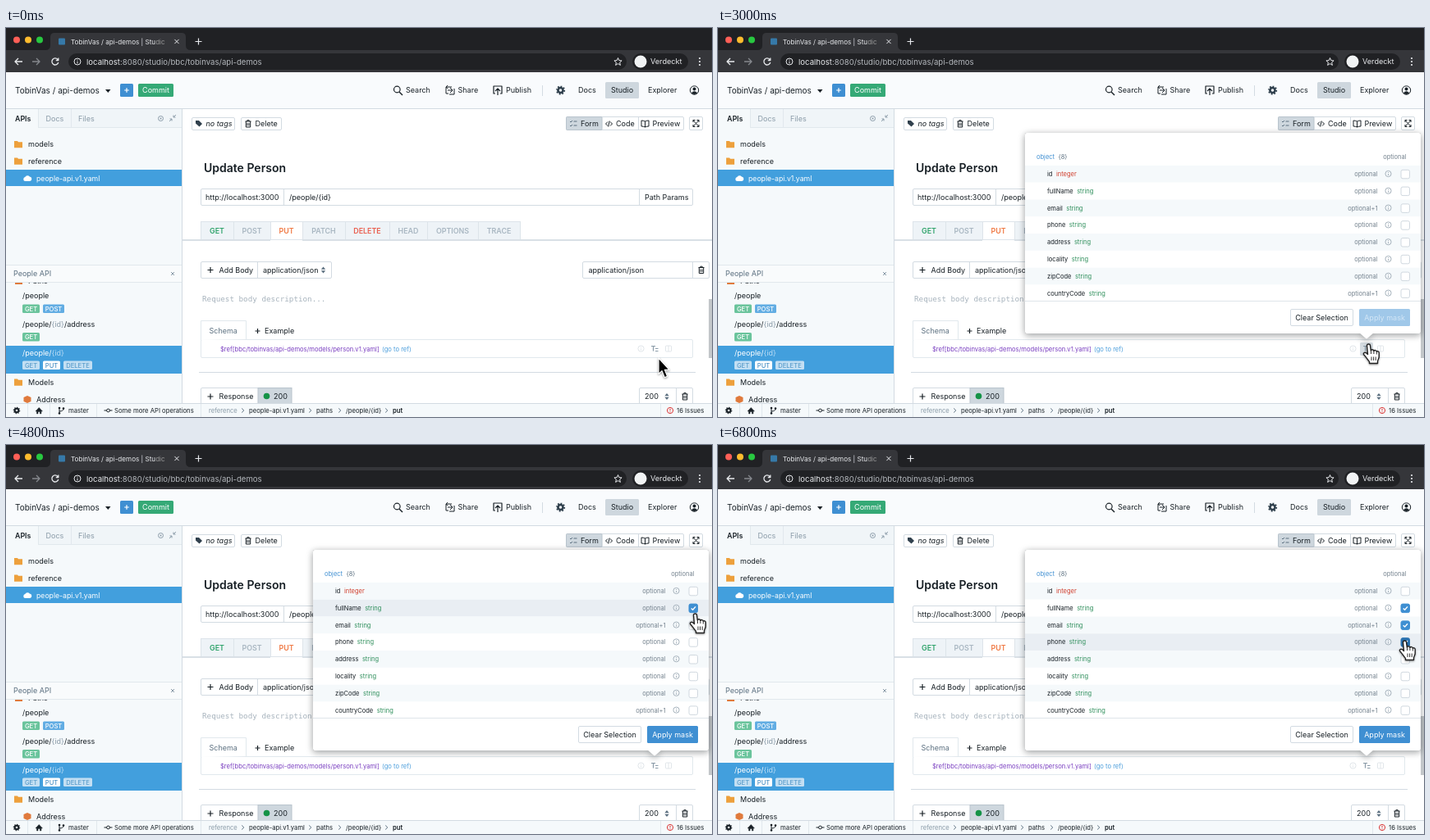
These frames come from a looping animation (860 by 475 pixels, 8000 ms). An HTML page:

```html
<!DOCTYPE html>
<html lang="en">
<head>
<meta charset="utf-8">
<title>API mask editor</title>
<style>
html, body { margin: 0; width: 100%; height: 100%; overflow: hidden; background: #fff }
svg { display: block; font-family: Inter, "Liberation Sans", sans-serif }
.mono { font-family: "DejaVu Sans Mono", monospace }
.pop { filter: drop-shadow(0 2px 4px #10161a50) drop-shadow(0 0 .6px #10161a70) }
.cursor { filter: drop-shadow(0 1px 1px #0006) }
</style>
</head>
<body>
<svg width="860" height="475" viewBox="0 0 860 475"><g id="page"></g><g id="live"></g></svg>
<script>
const INK = '#182026', GRAY = '#8a9ba8', MUTE = '#5c7080', LINE = '#d3dbe2', FAINT = '#e1e8ed';
const BLUE = '#3f8fd2', PALE = '#f5f9fb', ORANGE = '#eda03c';
const BOLD = 'font-weight="600"', MED = 'font-weight="500"', END = 'text-anchor="end"', MID = 'text-anchor="middle"';

const text = (x, y, size, s, fill = INK, attrs = '') =>
  `<text x="${x}" y="${y}" font-size="${size}" fill="${fill}" ${attrs}>${s}</text>`;
const rect = (x, y, w, h, fill, stroke = 'none', r = 0) =>
  `<rect x="${x}" y="${y}" width="${w}" height="${h}" rx="${r}" fill="${fill}" stroke="${stroke}"/>`;
const path = (d, stroke = INK, width = 1, fill = 'none') =>
  `<path d="${d}" stroke="${stroke}" stroke-width="${width}" fill="${fill}" stroke-linejoin="round"/>`;
const shape = (d, fill) => path(d, 'none', 0, fill);
const dot = (x, y, r, fill, stroke = 'none', attrs = '') =>
  `<circle cx="${x}" cy="${y}" r="${r}" fill="${fill}" stroke="${stroke}" ${attrs}/>`;
const frame = (x, y, w, h, stroke = LINE) => rect(x + .5, y + .5, w - 1, h - 1, '#fff', stroke, 1.5);

const plus = (x, y, r = 3.5, c = INK) => path(`M${x - r} ${y}h${2 * r}M${x} ${y - r}v${2 * r}`, c, 1.2);
const cross = (x, y, r, c) => path(`M${x - r} ${y - r}l${2 * r} ${2 * r}m0 ${-2 * r}l${-2 * r} ${2 * r}`, c);
const chevron = (x, y) => path(`M${x - 1.3} ${y - 2.5}l2.6 2.5-2.6 2.5`, MUTE);
const gear = (x, y, r, c) => dot(x, y, r * .65, 'none', c, `stroke-width="${r * .55}"`) +
  dot(x, y, r, 'none', c, `stroke-width="${r * .45}" pathLength="16" stroke-dasharray="1"`);
const info = (x, y, c) => dot(x, y, 3.6, 'none', c) + path(`M${x} ${y - 2}v1m0 1v2`, c);
const trash = (x, y) => path(`M${x - 3.5} ${y - 3}h7m-4.7 0v-1.3h2.4v1.3M${x - 2.7} ${y - 3}v7h5.4v-7m-3.7 2v3.4m2 0v-3.4`);
const carets = (x, y) => shape(`M${x} ${y - 4}l2.7 3.2h-5.4zM${x} ${y + 4}l2.7-3.2h-5.4z`, MUTE);
const folder = (x, y) => shape(`M${x} ${y}h4l1 1.3h5v7H${x}z`, ORANGE);
const badge = (x, y, w, s, fill, color = '#fff') =>
  rect(x, y, w, 10.5, fill, 'none', 1.5) + text(x + w / 2, y + 8, 7.6, s, color, `${MID} ${MED}`);

function chrome() {
  const light = '#e8eaed';
  return rect(0, 0, 860, 54, '#202124') + rect(0, 27, 860, 27, '#35363a') +
    dot(13, 14.5, 4, '#ff5f57') + dot(27, 14.5, 4, '#febc2e') + dot(41, 14.5, 4, '#28c840') +
    shape('M48 27q6 0 6-6v-10q0-5 5-5h155q5 0 5 5v10q0 6 6 6z', '#35363a') +
    rect(64, 12.5, 8, 8, '#3679a8', 'none', 1) +
    text(79, 20, 8.1, 'TobinVas / api-demos | Stu<tspan fill="#999">dic</tspan>', light) +
    cross(208, 16.5, 2.6, light) + plus(234.5, 16.5, 4, light) +
    path('M20 41h-9m4-4l-4 4 4 4', light, 1.3) + path('M32 41h9m-4-4l4 4-4 4', '#85888d', 1.3) +
    path('M63 38.4a4 4 0 1 0 .8 3.6M63.8 36.5v3h-3', light, 1.3) +
    rect(76, 31, 680, 20, '#202124', 'none', 10) +
    dot(87, 41, 4, 'none', light) + path('M87 38.6v1m0 1v2.8', light) +
    text(98, 44.5, 9.6, 'localhost<tspan fill="#b4b8bd">:8080/studio/bbc/tobinvas/api-demos</tspan>', light) +
    path('M745.5 36.5l1.3 3.1 3.3.3-2.5 2.2.8 3.3-2.9-1.8-2.9 1.8.8-3.3-2.5-2.2 3.3-.3z', light) +
    rect(763, 31, 68, 20, '#202124', 'none', 10) + dot(773, 41, 7.5, '#f1f3f4') +
    text(785, 44.3, 9.1, 'Verdeckt', light) +
    [37, 41, 45].map(y => dot(845, y, 1.1, light)).join('');
}

function header() {
  return rect(0, 54, 860, 45, '#f9fbfd') + rect(0, 98, 860, 1, LINE) +
    text(11, 80, 10, 'TobinVas / api-demos') + shape('M121 75h6.5l-3.2 4z', INK) +
    rect(139, 68, 16, 16, BLUE, 'none', 1.5) + plus(147, 76, 2.8, '#fff') +
    rect(161, 68, 43, 16, '#35a976', 'none', 1.5) + text(182.5, 79.4, 9, 'Commit', '#fff', MID) +
    dot(476.3, 75, 3.8, 'none', INK, 'stroke-width="1.2"') + path('M479 78l4 4', INK, 1.5) +
    text(487, 79.3, 9, 'Search') +
    path('M543 72h-7v8h3M538 70l-2 2 2 2M538 76h6m-3-3l3 3-3 3M546 74v7h-6') + text(550.5, 79.3, 9, 'Share') +
    path('M596 80h-2v-9h10v9h-2M599 82v-8m-3 3l3-3 3 3', INK, 1.2) + text(609, 79.3, 9, 'Publish') +
    rect(653, 70, 1, 13, LINE) + gear(675.5, 76, 4.6, '#30404d') +
    text(697, 79.3, 9, 'Docs') + rect(730, 66, 41, 20, '#ced7de', 'none', 1.5) +
    text(750.5, 79.3, 9, 'Studio', INK, MID) + text(782, 79.3, 9, 'Explorer') +
    dot(838.5, 76, 5.2, 'none', INK) + dot(838.5, 74.6, 2, INK) + path('M835 79.5q3.5-4 7 0l-3.5 1.6z', INK, .5, INK);
}

function sidebar() {
  const selected = '#429fdd', green = '#6ac49c', blue = '#62ade3';
  return rect(0, 99, 215, 359, PALE) + rect(39, 99, 175, 22, '#f0f5f8') +
    path('M39.5 99v22M39 121.5h175M79.5 99v22', FAINT) +
    text(11, 113.5, 8.8, 'APIs', INK, BOLD) + text(48.5, 113.5, 9, 'Docs', GRAY) + text(88, 113.5, 9, 'Files', GRAY) +
    dot(188.5, 110.5, 3, 'none', GRAY) + dot(188.5, 110.5, 1, GRAY) +
    path('M207 106l-3 3v-2.5m0 2.5h2.5M199 114l3-3v2.5m0-2.5h-2.5', GRAY) +
    folder(10, 138) + text(27, 145.3, 9, 'models') + folder(10, 158.5) + text(27, 166, 9, 'reference') +
    rect(0, 173, 214, 20, selected) +
    shape('M23 187a2.6 2.6 0 0 1 .3-5 3.2 3.2 0 0 1 5.5-.5 2.8 2.8 0 0 1 .4 5.5z', '#fff') +
    text(37, 186.5, 8.7, 'people-api.v1.yaml', '#fff') +
    text(27, 312, 9, 'Paths') + rect(11, 308, 9, 5, '#e07a3c') +
    rect(0, 289, 214, 21.5, '#f9fbfc') + path('M0 289.5h214M0 310.5h214', FAINT) +
    text(9, 303, 9, 'People API', MUTE) + cross(203, 300, 2, GRAY) +
    text(20, 330.3, 9, '/people') + badge(20, 337.5, 21, 'GET', green) + badge(45, 337.5, 26, 'POST', blue) +
    text(20, 364.8, 9, `/people/<tspan fill="${GRAY}">{id}</tspan>/address`) + badge(20, 372, 21, 'GET', green) +
    rect(0, 388, 214, 34, selected) + text(20, 399.8, 9, '/people/<tspan fill="#b9dcf5">{id}</tspan>', '#fff') +
    badge(20, 406.5, 21, 'GET', '#c3dff3', '#5b9dcb') + badge(45, 406.5, 21, 'PUT', '#fff', '#4a90c4') +
    badge(70, 406.5, 35, 'DELETE', '#c3dff3', '#5b9dcb') +
    folder(10, 428.5) + text(27, 436, 9, 'Models') +
    shape('M26 449l4.5 2v5l-4.5 2-4.5-2v-5z', '#e07a3c') + text(37, 457.3, 9, 'Address') +
    rect(214, 99, 1, 359, LINE);
}

function tabs() {
  const names = ['GET', 'POST', 'PUT', 'PATCH', 'DELETE', 'HEAD', 'OPTIONS', 'TRACE'];
  const edges = [237, 277, 322, 361, 413, 467, 513, 575, 626];
  const color = { GET: '#2fa36b', PUT: '#f07a45', DELETE: '#ea5f50' };
  return names.map((name, i) => {
    const x = edges[i], w = edges[i + 1] - x;
    return rect(x + .5, 236.5, w, 22, name == 'PUT' ? '#fff' : '#eef3f7', '#dde4ea') +
      text(x + w / 2, 251, 8.9, name, color[name] || '#a9b7c2', `${MID} ${BOLD}`);
  }).join('') + rect(215, 258, 107, 2, '#d9e0e6') + rect(361, 258, 499, 2, '#d9e0e6');
}

function main() {
  return frame(226, 109, 53, 16) + shape('M231 113h4l4 4-3.5 3.5-4.5-4z', '#30404d') +
    text(243.5, 120.3, 9, 'no tags', INK, 'font-style="italic"') +
    frame(286, 109, 50, 16) + trash(295, 117) + text(303.5, 120.3, 9, 'Delete') +
    frame(682, 108, 144, 17) + rect(682.5, 108.5, 43.5, 16, '#ced7de', '#b9c4cd', 1) + path('M770.5 109v15', LINE) +
    path('M687 114l1 1 2-2m-3 6l1 1 2-2M691.5 114h4m-4 5h4', MUTE) + text(700, 120.3, 9, 'Form') +
    path('M733 114.5l-2.5 2.5 2.5 2.5m3-5l2.5 2.5-2.5 2.5m-.8-6l-1.6 7') + text(743, 120.3, 9, 'Code') +
    path('M778.5 114q-2-1-4.5-1v7q2.5 0 4.5 1 2-1 4.5-1v-7q-2.5 0-4.5 1v7') + text(787.5, 120.3, 9, 'Preview') +
    frame(832, 108, 17, 17) + path('M837 115v-2.5h2.5m2 0h2.5v2.5m0 3v2.5h-2.5m-2 0h-2.5v-2.5m0-5.5l7 8m0-8l-7 8') +
    text(241, 175.8, 14, 'Update Person', INK, BOLD) +
    frame(237, 196, 600, 21) + path('M338.5 197v20M771.5 197v20', LINE) +
    text(243, 210.3, 9, 'http://localhost:3000') + text(345, 210.3, 9, '/people/{id}') + text(778, 210.3, 9, 'Path Params') +
    tabs() +
    frame(237, 285, 160, 21) + path('M306.5 286v19', LINE) + plus(249, 295.5) +
    text(259.5, 298.7, 9, 'Add Body') + text(313, 298.7, 9, 'application/json') + carets(386.5, 295.5) +
    frame(702, 285, 155, 21) + path('M836.5 286v19', LINE) + text(709.5, 298.7, 9, 'application/json') + trash(847, 295.5) +
    text(239, 334, 9.26, 'Request body description...', '#a7b3bd', 'class="mono"') +
    frame(237, 380, 600, 23, FAINT) + path('M237.5 381v-23.5h55V380', FAINT, 1, '#fff') +
    text(247.5, 373, 9, 'Schema', MUTE) + plus(306.5, 370, 3) + text(315, 373.3, 9, 'Example') +
    text(261, 394.8, 7.6, '$ref[bbc/tobinvas/api-demos/models/person.v1.yaml]', '#7a3fc0') +
    text(458, 394.8, 7.6, '(go to ref)', '#4d9fdc') +
    rect(235, 420, 605, 1, LINE) +
    frame(237, 439, 111, 24) + rect(307, 439.5, 41, 20, '#ced7de', '#b9c4cd') + plus(249, 450) +
    text(259.5, 453.2, 9, 'Response') + dot(317.5, 449.5, 3.8, '#159347') + text(326, 453.2, 9, '200') +
    frame(771, 439, 66, 24) + path('M816.5 440v18', LINE) + text(778, 453.2, 9, '200') + carets(805, 450) + trash(827, 450) +
    rect(856, 331, 4, 72, '#c3c7ca');
}

function footer() {
  const crumbs = [[247, 'reference'], [296, 'people-api.v1.yaml'], [378, 'paths'], [414, '/people/{id}'], [471, 'put']];
  return rect(0, 458, 860, 17, PALE) + rect(0, 458, 860, 1, LINE) +
    path('M26.5 459v16M53.5 459v16M110.5 459v16M237.5 459v16M797.5 459v16', FAINT) +
    gear(13, 467, 3.5, INK) + path('M36 468l4.2-4.5 4.2 4.5h-1.5v3h-1.5v-2.5h-2.4v2.5h-1.5v-3z', INK, .5, INK) +
    path('M65 464v6M70 465q0 3-5 3') + dot(65, 464, 1.3, INK) + dot(65, 470.5, 1.3, INK) + dot(70, 464.5, 1.3, INK) +
    text(76, 469.8, 7.7, 'master') + path('M119.5 467h3m4 0h3') + dot(124.5, 467, 1.9, 'none', INK) +
    text(132, 469.8, 7.7, 'Some more API operations') +
    crumbs.map(([x, s], i) => text(x, 469.8, 7.65, s, i ? INK : GRAY, i == 4 ? BOLD : '')).join('') +
    [288.5, 370.5, 406.5, 463.5].map(x => chevron(x, 467)).join('') +
    dot(809, 467, 3.6, 'none', '#db3737') + path('M809 464.8v2.5m0 1v1', '#db3737') + text(817, 469.8, 7.7, '16 Issues');
}

const fields = ['id', 'fullName', 'email', 'phone', 'address', 'locality', 'zipCode', 'countryCode'];
const checkedAt = { fullName: 4800, email: 5400, phone: 6800 };
const hovers = [[0, -1], [3600, 7], [3800, 6], [4000, 3], [4200, 2], [4400, 1], [5000, 2], [5600, 3]];
// time, hand (1) or arrow (0), position
const moves = [
  [0, 0, 795, 403], [200, 0, 795, 405], [600, 0, 793, 397], [800, 1, 784, 389], [3000, 1, 786, 385],
  [3200, 1, 791, 374], [3400, 0, 797, 375], [3600, 0, 802, 333], [3800, 1, 806, 299], [4000, 1, 835, 238],
  [4200, 1, 834, 216], [4400, 1, 831, 200], [4600, 1, 833, 204], [4800, 1, 833, 205], [5000, 1, 834, 220],
  [5200, 1, 831, 220], [5600, 1, 831, 230], [5800, 1, 830, 238]
];
const latest = (list, t) => list.findLast(e => e[0] <= t);

function checkbox(y, on, pressed, over) {
  const fill = on ? over ? '#2a72b0' : BLUE : pressed ? '#d3dbe1' : '#fff';
  return rect(832, y - 5, 10.5, 10.5, fill, on ? fill : '#d0d8df', 2) +
    (on ? path(`M834.7 ${y + .3}l1.9 1.9 3.4-3.9`, '#fff', 1.4) : '');
}

function row(name, i, t, hover) {
  const y = 178.3 + i * 20.8, over = i == hover;
  const fill = over ? '#e9eef3' : i % 2 ? '#fff' : PALE;
  const [type, color] = name == 'id' ? ['integer', '#d0402f'] : ['string', '#2f8f5c'];
  const more = name == 'email' || name == 'countryCode' ? '+1' : '';
  return rect(374, y - 10.4, 482, 20.8, fill) +
    text(401, y + 2.7, 7.5, `${name}<tspan dx="4.5" fill="${color}">${type}</tspan>`) +
    text(803.5, y + 2.7, 7.5, 'optional' + more, '#74828e', END) +
    (over && name == 'zipCode' ? rect(808, y - 8, 17, 16, '#d3dae0', 'none', 1.5) : '') + info(816.5, y - .3, '#a7b3bd') +
    checkbox(y, t >= checkedAt[name], name == 'phone' && t >= 6600, over && i > 1);
}

function popover(t) {
  if (t < 1200) return '';
  const open = t >= 3000, top = open ? 128 : 315, ready = t >= 3200;
  const growing = t < 1400 ? 'opacity=".7" transform="translate(790 381) scale(.88) translate(-790 -381)"' : '';
  return `<g class="pop" ${growing}>` +
    shape(`M376 ${top}H854q2 0 2 2V371q0 2-2 2H798l-8 7-8-7H376q-2 0-2-2V${top + 2}q0-2 2-2z`, '#fff') +
    (open ? text(388, 160.3, 7.5, `object<tspan dx="4.5" fill="${MUTE}">{8}</tspan>`, BLUE) +
      text(838.5, 160.3, 7.5, 'optional', '#74828e', END) +
      fields.map((f, i) => row(f, i, t, latest(hovers, t)[1])).join('') : '') +
    rect(374, 333, 482, 38, '#fff') + rect(374, 333, 482, 1, '#dfe5ea') +
    rect(697.5, 343.5, 76, 20, '#fff', LINE, 1.5) + text(735.5, 356.7, 9, 'Clear Selection', INK, MID) +
    rect(781, 343, 62, 21, ready ? BLUE : '#a0c8e9', 'none', 1.5) +
    text(812, 356.7, 9, 'Apply mask', ready ? '#fff' : '#d3e6f6', MID) + '</g>';
}

function schemaIcons(t) {
  const lit = t >= 600 && t < 3200;
  return info(773.5, 391.5, '#e1e6ea') +
    (lit ? rect(782, 384, 16, 16, t < 1000 ? '#e4e9ed' : '#d6dde2', 'none', 1.5) : '') +
    path('M786 388.5h5m-2.5 0v6M791 391.5h3.5m-3.5 3h3.5', GRAY, 1.2) +
    rect(803.5, 388, 7, 7, 'none', '#e1e6ea', 1) + path('M807 388v7', '#e1e6ea');
}

const tooltip = t => t < 800 || t >= 1200 ? '' :
  shape('M757 348h67q2 0 2 2v20q0 2-2 2h-28l-5.5 6-5.5-6h-28q-2 0-2-2v-20q0-2 2-2z', '#394b59') +
  text(790.5, 363, 9, 'Edit mask', PALE, MID);

const handOutline = 'M4.5 3c0-2.6 4-2.6 4 0l.8 6c.4-1.8 3.4-1.6 3.6.4.6-1.4 3.2-1 3.4.8.8-1 2.9-.4 2.9 1.4v5c0 2-1.7 3.6-1.7 5.4' +
  'v2.5H7.5v-2C5.5 20.5 3.4 16.5.9 14c-1.4-1.6.6-3.6 2.4-2.4l2.2 2z';

function cursor(t) {
  const [, hand, x, y] = latest(moves, t);
  return `<g class="cursor" transform="translate(${x} ${y})">` + (hand
    ? path(handOutline, '#222', 1.4, '#fff') +
      path('M9.5 9v4M12.9 9.5v3.5M16.3 10.5v3M10 16.5v4.5M12.6 16.5v4.5M15.2 16.5v4.5', '#333')
    : path('M0 0V19.5L4 15.7 7.3 23.8l3.3-1.4L7.4 14.4H13z', '#fff', 1.2, '#000')) + '</g>';
}

const page = document.getElementById('page'), live = document.getElementById('live');
page.innerHTML = rect(0, 0, 860, 475, '#fff') + chrome() + header() + sidebar() + main() + footer();

let shown = -1;
function tick(now) {
  const t = Math.floor(now % 8000 / 200) * 200;
  if (t != shown) {
    shown = t;
    live.innerHTML = schemaIcons(t) + tooltip(t) + popover(t) + cursor(t);
  }
  requestAnimationFrame(tick);
}
tick(performance.now());
</script>
</body>
</html>
```
